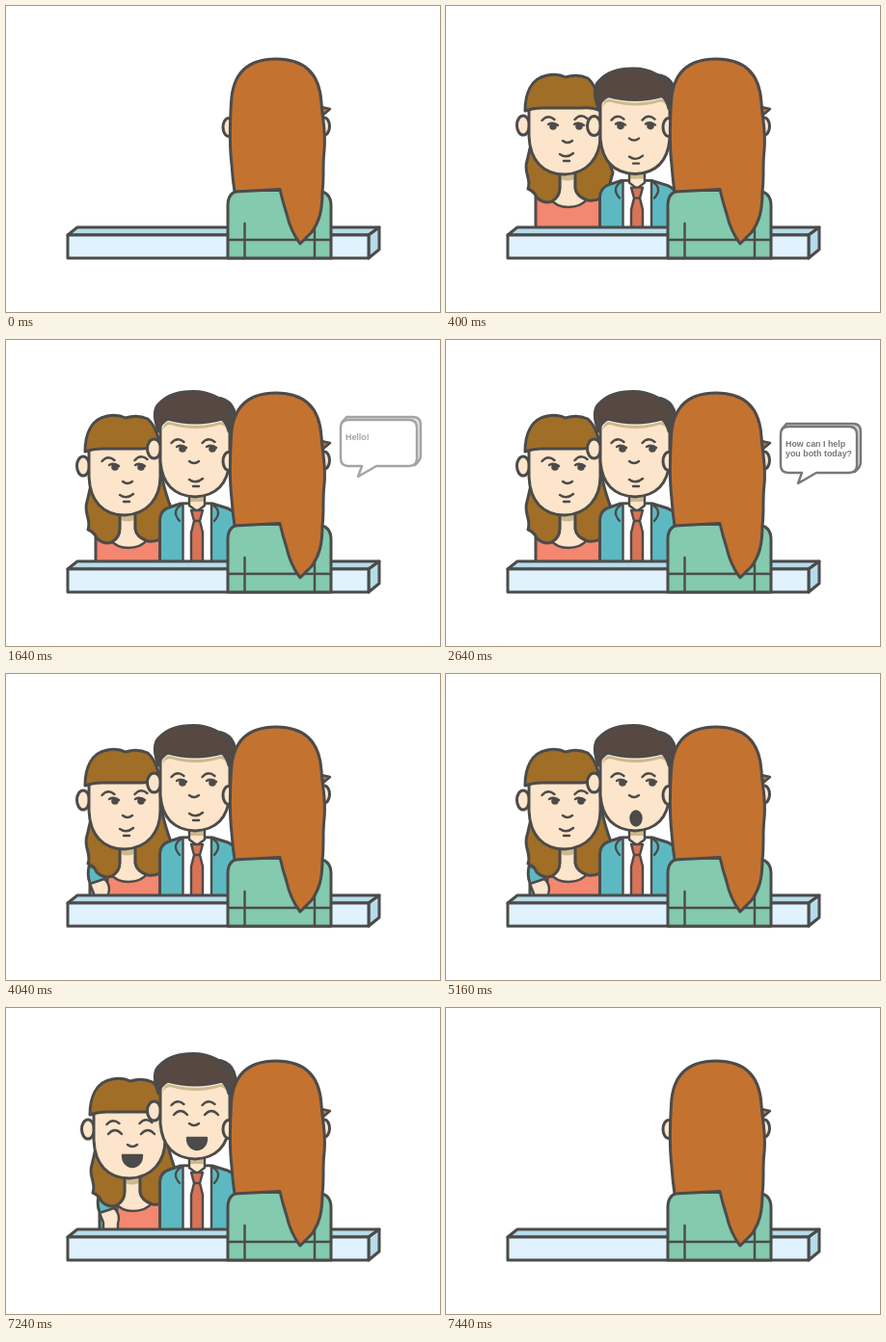
Recreate the animation shown at these times as an HTML page. Size 450 by 318 pixels, loop 7.6 s.

```html
<!DOCTYPE html>
<html lang="en">
<head>
<meta charset="utf-8">
<title>At the front desk</title>
<style>
  html, body { margin: 0; width: 100%; height: 100%; overflow: hidden; background: #fff; }
  svg { display: block; width: 450px; height: 318px; }
  .ink { stroke: #4c4b4a; stroke-width: 3; stroke-linejoin: round; stroke-linecap: round; }
  .line { fill: none; }
  .thin { stroke-width: 2.4; }
  .skin { fill: #fce5ca; }
  .shade { fill: #cbb990; }
  .teal { fill: #5db9c1; }
  .coral { fill: #f4876f; }
  .brown { fill: #a06e26; }
  .dark { fill: #574841; }
  .pupil { fill: #4c4b4a; }
  .rust { fill: #c4722f; }
  .mint { fill: #83caae; }
  text { font: bold 8.9px "Liberation Sans", Arial, sans-serif; fill: #4b4b4b; }
</style>
</head>
<body>
<svg viewBox="0 0 450 318">
  <defs><clipPath id="above"><rect width="450" height="231"/></clipPath></defs>

  <g clip-path="url(#above)">
    <g id="woman">
      <path class="ink coral" d="M93 255V205H163V255Z"/>
      <path class="ink skin thin" d="M118 176V197Q117 204 108 207Q114 216 127 216Q140 216 147 207Q135 204 134 197V176Z"/>
      <path class="shade" d="M119 180H133V187Q126 190 119 187Z"/>
      <g id="arm">
        <path class="ink teal" d="M87 255V217Q84 210 86 200H105V215L97 255Z"/>
        <path class="ink skin thin" d="M91 255V228L87 218L102 213Q109 219 106 229V255Z"/>
      </g>
      <path class="ink brown" d="M90 112C91 140 88 152 84 168C80 180 89 187 85 197Q92 200 94 206Q102 213 110 210Q118 205 118 196V176H134V196Q135 205 147 209Q160 211 168 199L173 180C167 163 161 150 158 112Z"/>
      <g id="womanHead">
        <ellipse class="ink skin" cx="80" cy="131" rx="6.500" ry="10"/>
        <path class="ink skin" d="M86 112V142C87 168 101 182 123 182C147 181 160 164 160 142V112Z"/>
        <path class="ink brown" d="M82 116C82 98 88 82 105 79Q116 77 124 81Q136 77 147 82Q158 92 160 116Q152 112 140 113H100Q90 113 82 116Z"/>
        <g id="womanFace"></g>
      </g>
    </g>
    <g id="man">
      <path class="ink dark" d="M218 60C230 61 241 68 238 95H224Z"/>
      <path class="ink teal" d="M159.500 255V187Q160 177 169 174L181 170H214L230 175Q240 179 240 190V255Z"/>
      <path class="ink thin" fill="#fff" d="M183.500 170V255H213V170Z"/>
      <path class="skin" d="M190 156H206V173L198 179L190 173Z"/>
      <path class="shade" d="M191 162H205V168H191Z"/>
      <path class="ink line thin" d="M190 162V172L198 178L206 172V162"/>
      <path class="ink thin" fill="#d87355" d="M192 177H204L201 188L204 200V255H192V200L195 188ZM195 188H201"/>
      <path class="ink line thin" d="M182 171Q171 178 180 188M214 171Q225 178 216 188"/>
      <ellipse class="ink skin" cx="153.500" cy="113" rx="7" ry="10"/>
      <path class="ink skin" d="M160 82V126C162 150 175 162 196 163C218 162 230 150 232 126V82Z"/>
      <path class="shade" d="M162 94Q164 85 169 85Q197 93 223 85Q230 87 230 94Q227 88 222 88Q197 96 170 88Q165 88 162 94Z"/>
      <path class="ink dark" d="M158 95C154 84 152 72 159 66C168 56 180 53.500 194 53.500C212 53.500 226 61 231 74Q234 85 231 95Q229 86 224 82Q196 90 168 82Q160 86 158 95Z"/>
      <g id="manFace"></g>
    </g>
  </g>

  <g class="ink">
    <path fill="#b5dcea" d="M64 238L74 230H387L376 238Z"/>
    <path fill="#b5dcea" d="M376 238L387 230V253L376 262Z"/>
    <path fill="#e0f2fd" d="M64 238H376V262H64Z"/>
  </g>

  <ellipse class="ink skin" cx="231" cy="126" rx="6" ry="9.500"/>
  <ellipse class="ink skin" cx="330" cy="125" rx="5.500" ry="9"/>
  <path class="ink rust thin" d="M327 105L336 107L329 113Z"/>
  <path class="ink mint" d="M230 262V207Q230 193 243 191.500H322Q337 193 337 207V262Z"/>
  <path class="ink line thin" d="M230 243H337M247.500 226V262M320 226V262"/>
  <path class="ink rust" d="M233.500 100C235 70 250 55 280 55C310 55 325 70 327 100C328 118 332 130 330 150C328 166 330 178 328 193C328 212 325 224 317 235L305 247Q295 234 291 216Q287 204 284 190.500L237 193Q235 180 234 165Q231 140 233.500 100Z"/>

  <g id="bubble" opacity="0">
    <path class="ink thin" fill="#c9c9c9" d="M348 100L353 94H422Q430 94 430 102V134Q430 139 424 144Z"/>
    <path class="ink thin" fill="#fff" d="M355 97H418Q426 97 426 105V137Q426 145 418 145H384L365 156L369 145H355Q347 145 347 137V105Q347 97 355 97Z"/>
    <g id="words"></g>
  </g>
</svg>

<script>
const LOOP = 7600, STEP = 40;
const $ = id => document.getElementById(id);

// Linear value at time t from [time, value] pairs.
function at(t, keys) {
  if (t <= keys[0][0]) return keys[0][1];
  for (let i = 1; i < keys.length; i++) {
    const [a, u] = keys[i - 1], [b, v] = keys[i];
    if (t <= b) return u + (v - u) * (t - a) / (b - a);
  }
  return keys[keys.length - 1][1];
}

const exit = [[7080, 0], [7160, -8], [7200, -12], [7240, -6], [7320, 55], [7440, 190]];
const womanY = [[0, 160], [240, 22], [320, -11], [400, -7], [520, 3], [640, 0], ...exit];
const manY = [[120, 190], [360, 28], [460, -13], [540, -6], [640, 3], [720, 0], ...exit];
const gazeKeys = [[880, 0], [1120, 1], [3160, 1], [3360, -1], [3680, -1], [3920, 1]];
const armKeys = [[3120, 34], [3560, 4], [3680, -4], [3800, 1], [3920, 0]];
const talkKeys = [[4320, 0], [4440, 1], [4560, .6], [4720, .6], [4760, 0],
                  [4920, 0], [5040, .6], [5160, 1], [5280, 1], [5400, 0]];
const laughKeys = [[6480, 0], [6680, 1]];

const speeches = [
  { from: 840, to: 1600, lines: [["Hello!", 118]] },
  { from: 1920, to: 2640, lines: [["How can I help", 118], ["you both today?", 128]] },
  { from: 5960, to: 7120, lines: [["No problem!", 113], ["I can do that for", 125], ["you today!", 135]] }
];

const stroke = d => `<path class="ink line thin" d="${d}"/>`;
const brow = (x, y) => stroke(`M${x - 6.5} ${y + 2}q6 -7 13 -1`);

function eye(x, y, gaze, shut) {
  if (shut) return stroke(`M${x - 7} ${y + 4}q7 -8 14 0`);
  return stroke(`M${x - 5 + gaze} ${y - 2}q5 -3 10 1`) +
    `<circle class="pupil" cx="${x + 2 * gaze}" cy="${y}" r="3.8"/>`;
}

function mouth(x, y, talk, laugh) {
  if (laugh > 0) {
    const w = 6 + 4 * laugh, h = 16 * laugh, top = y - 4;
    return `<path class="ink pupil thin" d="M${x - w} ${top}H${x + w}C${x + w} ${top + h} ${x - w} ${top + h} ${x - w} ${top}Z"/>`;
  }
  if (talk > 0)
    return `<ellipse class="ink pupil thin" cx="${x}" cy="${y + 5}" rx="${3.5 + 2 * talk}" ry="${1.5 + 6 * talk}"/>`;
  return stroke(`M${x - 7} ${y}q7 5 14 -1`) + stroke(`M${x - 3} ${y + 7}h6`);
}

const nose = (x, y) => stroke(`M${x - 5} ${y}q5 4 10 0`);
const move = (id, x, y) => $(id).setAttribute("transform", `translate(${x} ${y})`);

let shown = null;
function say(t) {
  const s = speeches.find(s => t >= s.from && t < s.to + 120);
  if (s && s !== shown) {
    $("words").innerHTML = s.lines.map(([w, y]) => `<text x="352" y="${y}">${w}</text>`).join("");
    shown = s;
  }
  if (!s) return $("bubble").setAttribute("opacity", 0);
  const enter = at(t, [[s.from - 40, 0], [s.from + 40, 1]]);
  const leave = at(t, [[s.to - 40, 0], [s.to + 120, 1]]);
  $("bubble").setAttribute("opacity", enter * (1 - leave));
  move("bubble", 0, 14 * (1 - enter) - 28 * leave);
}

function draw(t) {
  const gaze = at(t, gazeKeys), laugh = at(t, laughKeys);
  const happy = laugh > .4;
  const shut = happy || (t >= 5400 && t < 5560);
  const reply = t >= 2960 && t < 3160 ? .8 : laugh;

  move("woman", 5 * laugh, at(t, womanY) + laugh);
  move("man", 0, at(t, manY));
  move("arm", 5 * laugh, at(t, armKeys));
  $("arm").style.display = t < 3160 ? "none" : "";

  $("womanFace").innerHTML =
    brow(106, 124) + brow(140, 123) +
    eye(111 - 3 * laugh, 132, gaze, shut) + eye(138 + 4 * laugh, 132, gaze, shut) +
    nose(126, 147) +
    mouth(125 + laugh, 161 + laugh, 0, laugh);
  $("manFace").innerHTML =
    brow(178, 105) + brow(210, 105) +
    eye(181, 113, gaze, shut) + eye(212 + laugh, 113, gaze, shut) +
    nose(195, 126) +
    mouth(197 + laugh, 145, at(t, talkKeys), reply);
  say(t);
}

const start = performance.now();
function tick() {
  const t = (performance.now() - start) % LOOP;
  draw(Math.floor(t / STEP) * STEP);
  requestAnimationFrame(tick);
}
tick();
</script>
</body>
</html>
```
